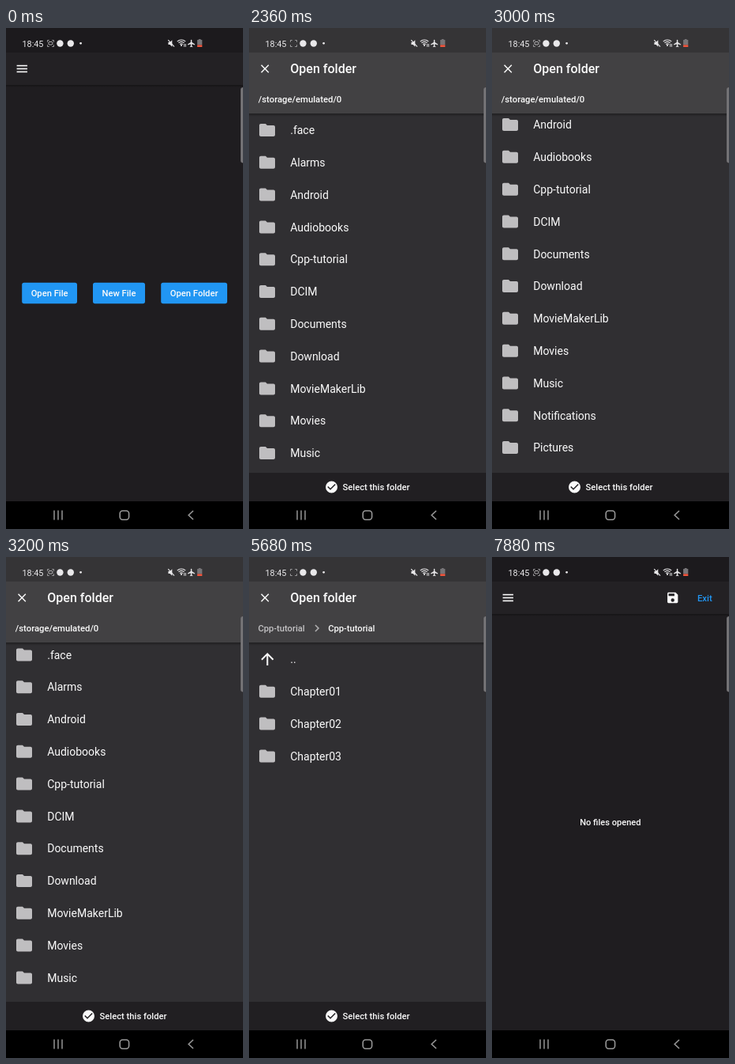
Animation, 300 px wide and 633 px high, one loop 8280 ms. Source, as an HTML page with a canvas:

```html
<!DOCTYPE html>
<html lang="en">
<head>
<meta charset="utf-8">
<title>Open folder</title>
<style>
html, body { margin: 0; width: 100%; height: 100%; overflow: hidden; background: #000; }
canvas { display: block; width: 300px; height: 633px; }
</style>
</head>
<body>
<canvas id="stage"></canvas>
<script>
const W = 300, H = 633, PAGE_H = 598, LOOP = 8280, STEP = 40;
const ROW_Y = 129, ROW_H = 40.8;
const OPEN_AT = 1135, ENTER_AT = 4000, CLOSE_AT = 5705, ZOOM_MS = 300;
const BLUE = '#2196f3', WHITE = '#fafafa', BG = '#1f1d20', BAR = '#232124';

const FOLDERS = ['.face', 'Alarms', 'Android', 'Audiobooks', 'Cpp-tutorial', 'DCIM',
  'Documents', 'Download', 'MovieMakerLib', 'Movies', 'Music', 'Notifications',
  'Pictures', 'Podcasts', 'Ringtones'];
const CHAPTERS = ['Chapter01', 'Chapter02', 'Chapter03'];

// Icons on a 24-unit grid
const ICON = {
  folder: 'M10 4H4c-1.1 0-2 .9-2 2v12c0 1.1.9 2 2 2h16c1.1 0 2-.9 2-2V8c0-1.1-.9-2-2-2h-8z',
  up: 'M4 12l1.41 1.41L11 7.83V20h2V7.83l5.58 5.59L20 12l-8-8z',
  close: 'M19 6.41L17.59 5 12 10.59 6.41 5 5 6.41 10.59 12 5 17.59 6.41 19 12 13.41 17.59 19 19 17.59 13.41 12z',
  check: 'M12 2a10 10 0 1 0 0 20a10 10 0 1 0 0-20zM10 17l-5-5 1.41-1.41L10 14.17l7.59-7.59L19 8z',
  next: 'M10 6L8.59 7.41 13.17 12l-4.58 4.59L10 18l6-6z',
  save: 'M17 3H5c-1.1 0-2 .9-2 2v14c0 1.1.9 2 2 2h14c1.1 0 2-.9 2-2V7zM12 19a3 3 0 1 1 0-6a3 3 0 1 1 0 6zM15 9H5V5h10z',
  plane: 'M21 16v-2l-8-5V3.500a1.500 1.500 0 0 0-3 0V9l-8 5v2l8-2.500V19l-2 1.500V22l3.500-1 3.500 1v-1.500L13 19v-5.500z',
  speaker: 'M3 9v6h4l5 5V4L7 9z'
};
for (const k in ICON) ICON[k] = new Path2D(ICON[k]);

const stage = document.getElementById('stage');
const layer = document.createElement('canvas');
const dpr = window.devicePixelRatio || 1;
for (const c of [stage, layer]) {
  c.width = Math.round(W * dpr);
  c.height = Math.round(H * dpr);
}
const screen = stage.getContext('2d'), over = layer.getContext('2d');
let g = screen;

const clamp = (v) => Math.min(1, Math.max(0, v));
const span = (v, a, b) => clamp((v - a) / (b - a));
const mix = (a, b, k) => a + (b - a) * k;
const ease = (k) => 0.5 - 0.5 * Math.cos(Math.PI * k);

function bezier(p, u) {
  const v = 1 - u;
  return v * v * v * p[0] + 3 * v * v * u * p[1] + 3 * v * u * u * p[2] + u * u * u * p[3];
}

// Fast start, very slow finish: two joined cubics
function zoomCurve(k) {
  if (k <= 0 || k >= 1) return clamp(k);
  const first = k < 1 / 6;
  const xs = first ? [0, 0.05, 0.133333, 1 / 6] : [1 / 6, 0.208333, 0.25, 1];
  const ys = first ? [0, 0, 0.06, 0.4] : [0.4, 0.82, 1, 1];
  let lo = 0, hi = 1;
  for (let i = 0; i < 24; i++) {
    const mid = (lo + hi) / 2;
    if (bezier(xs, mid) < k) lo = mid; else hi = mid;
  }
  return bezier(ys, lo);
}

function rect(x, y, w, h, color) {
  g.fillStyle = color;
  g.fillRect(x, y, w, h);
}

function round(x, y, w, h, r) {
  g.beginPath();
  g.roundRect(x, y, w, h, r);
}

function disc(x, y, r, color) {
  g.fillStyle = color;
  g.beginPath();
  g.arc(x, y, r, 0, 7);
  g.fill();
}

function line(points, color, width) {
  g.strokeStyle = color;
  g.lineWidth = width;
  g.beginPath();
  points.forEach(([x, y], i) => i ? g.lineTo(x, y) : g.moveTo(x, y));
  g.stroke();
}

// y is the middle of the capitals
function text(str, x, y, size, weight = 500, color = WHITE, align = 'left') {
  g.font = `${weight} ${size}px Roboto, sans-serif`;
  g.fillStyle = color;
  g.textAlign = align;
  g.fillText(str, x, y + size * 0.355);
}

function icon(name, x, y, scale, color = WHITE, turn = 0) {
  g.save();
  g.translate(x, y);
  g.rotate(turn);
  g.scale(scale, scale);
  g.translate(-12, -12);
  g.fillStyle = color;
  g.fill(ICON[name], 'evenodd');
  g.restore();
}

function shadow(y, h) {
  const fade = g.createLinearGradient(0, y, 0, y + h);
  fade.addColorStop(0, 'rgba(0,0,0,.35)');
  fade.addColorStop(1, 'rgba(0,0,0,0)');
  rect(0, y, W, h, fade);
}

function zoomed(scale, draw) {
  g.save();
  g.beginPath();
  g.rect(0, 0, W, PAGE_H);
  g.clip();
  g.translate(W / 2, PAGE_H / 2);
  g.scale(scale, scale);
  g.translate(-W / 2, -PAGE_H / 2);
  draw();
  g.restore();
}

function appBar() {
  rect(0, 0, W, PAGE_H, BG);
  shadow(72, 3);
  rect(0, 0, W, 72, BAR);
  for (const y of [47.6, 51.5, 55.4]) rect(13.6, y - 0.8, 13.4, 1.6, WHITE);
}

function button(label, x, w) {
  g.fillStyle = BLUE;
  round(x, 321.7, w, 26.6, 2.8);
  g.fill();
  text(label, x + w / 2, 335, 11.2, 500, WHITE, 'center');
}

function home(t) {
  appBar();
  button('Open File', 20.2, 69.8);
  button('New File', 110, 66);
  button('Open Folder', 196.2, 83.8);
  const press = span(t, 840, 1100);
  if (press > 0) {
    g.save();
    round(196.2, 321.7, 83.8, 26.6, 2.8);
    g.clip();
    disc(238, 335, mix(5, 46, press), 'rgba(255,255,255,.2)');
    g.restore();
  }
}

function editor() {
  appBar();
  icon('save', 228.7, 51.5, 0.74);
  text('Exit', 269.3, 51.5, 11.3, 500, BLUE, 'center');
  text('No files opened', 149.8, 335, 11.05, 500, WHITE, 'center');
}

function row(label, y) {
  icon('folder', 23, y, 1, '#bfbec0');
  text(label, 52.2, y + 0.3, 14, 400);
}

function scrollAt(t) {
  const peak = 131;
  return t < 2840 ? peak * ease(span(t, 2500, 2840)) : peak * (1 - ease(span(t, 2840, 3255)));
}

function dialog(t) {
  const inside = t >= ENTER_AT;
  rect(0, 0, W, PAGE_H, '#302f32');
  if (inside) {
    icon('up', 23.3, ROW_Y, 1);
    text('..', 52.2, ROW_Y + 0.3, 14, 400);
    CHAPTERS.forEach((name, i) => row(name, ROW_Y + ROW_H * (i + 1)));
  } else {
    const top = ROW_Y - scrollAt(t);
    FOLDERS.forEach((name, i) => row(name, top + ROW_H * i));
  }
  shadow(108, 4);
  rect(0, 0, W, 108, '#424143');
  icon('close', 20.2, 51.5, 0.74);
  text('Open folder', 52.3, 51.5, 16);
  if (inside) {
    text('Cpp-tutorial', 11.5, 90, 11.2, 500, '#c4c3c5');
    icon('next', 86, 90, 0.76, '#b0afb1');
    text('Cpp-tutorial', 100.2, 90, 11.2);
  } else {
    text('/storage/emulated/0', 11.8, 90, 11.3);
  }
  rect(0, 562, W, 36, '#211f22');
  icon('check', 104.5, 580, 0.75);
  text('Select this folder', 118.6, 580, 11.2);
}

function showDialog(t, scale, alpha) {
  if (alpha <= 0) return;
  g = over;
  g.setTransform(dpr, 0, 0, dpr, 0, 0);
  g.clearRect(0, 0, W, H);
  zoomed(scale, () => dialog(t));
  g = screen;
  g.globalAlpha = alpha;
  g.drawImage(layer, 0, 0, W, H);
  g.globalAlpha = 1;
}

function statusBar(t) {
  const ink = '#e9e8ea';
  rect(0, 0, W, 31, 'rgba(0,0,0,.2)');
  text('18:45', 20.5, 19.7, 10.8, 400, ink);

  for (const [x, sx] of [[52.5, 1], [60.5, -1]]) {
    for (const [y, sy] of [[15.5, 1], [23.5, -1]]) {
      line([[x, y + 2.2 * sy], [x, y], [x + 2.2 * sx, y]], '#a9a8aa', 0.9);
    }
  }
  const lit = Math.floor((t + 185) / 502.67) % 2 === 0;
  if (lit) {
    g.strokeStyle = '#c4c3c5';
    g.lineWidth = 0.9;
    round(53.9, 17.5, 5, 3.5, 1);
    g.stroke();
  }
  disc(68.4, 19.5, 4.2, ink);
  disc(81.8, 19.5, 4.2, ink);
  disc(94.6, 19.3, 1.4, ink);

  icon('speaker', 210.3, 19.5, 0.54, ink);
  line([[205.2, 15.2], [213, 23.6]], ink, 1.1);

  g.strokeStyle = ink;
  g.lineWidth = 1.2;
  for (const r of [2.6, 5, 7.4]) {
    g.beginPath();
    g.arc(222, 22.4, r, -Math.PI * 0.75, -Math.PI * 0.25);
    g.stroke();
  }
  disc(222, 22, 1.1, ink);
  line([[225.6, 20], [225.6, 23.8]], ink, 0.9);
  line([[227.4, 20], [227.4, 23.8]], ink, 0.9);

  icon('plane', 234.8, 19.5, 0.48, ink);
  rect(243.8, 14, 2.8, 1.4, '#777578');
  rect(242.1, 15, 6.2, 6.4, '#777578');
  rect(242.1, 21.4, 6.2, 2.6, '#f0543c');
}

function navBar() {
  const ink = '#969696';
  rect(0, PAGE_H, W, H - PAGE_H, '#000');
  for (const x of [61, 66, 71]) line([[x, 609.5], [x, 621.5]], ink, 1.5);
  g.strokeStyle = ink;
  g.lineWidth = 1.6;
  round(144.2, 610, 11.4, 11.2, 3.4);
  g.stroke();
  line([[237, 610], [231.2, 615.5], [237, 621]], ink, 1.6);
}

function edgeHandle() {
  g.fillStyle = '#737275';
  round(297, 75, 6, 95.5, 3);
  g.fill();
}

function draw(t) {
  g = screen;
  g.setTransform(dpr, 0, 0, dpr, 0, 0);
  rect(0, 0, W, H, '#000');

  const opening = span(t, OPEN_AT, OPEN_AT + ZOOM_MS);
  const closing = span(t, CLOSE_AT, CLOSE_AT + ZOOM_MS);
  if (closing > 0) {
    const k = zoomCurve(closing);
    zoomed(mix(1.1, 1, k), editor);
    showDialog(t, mix(1, 0.9, k), 1 - span(closing, 0.05, 0.16));
  } else {
    const k = zoomCurve(opening);
    if (opening < 1) {
      zoomed(mix(1, 1.05, k), () => home(t));
      rect(0, 0, W, PAGE_H, `rgba(0,0,0,${0.6 * span(opening, 0.1, 0.36)})`);
    }
    showDialog(t, mix(0.85, 1, k), span(opening, 0.1, 0.2));
  }
  statusBar(t);
  navBar();
  edgeHandle();
}

const start = performance.now();
function tick() {
  const t = (performance.now() - start) % LOOP;
  draw(Math.floor(t / STEP) * STEP);
  requestAnimationFrame(tick);
}
tick();
</script>
</body>
</html>
```
